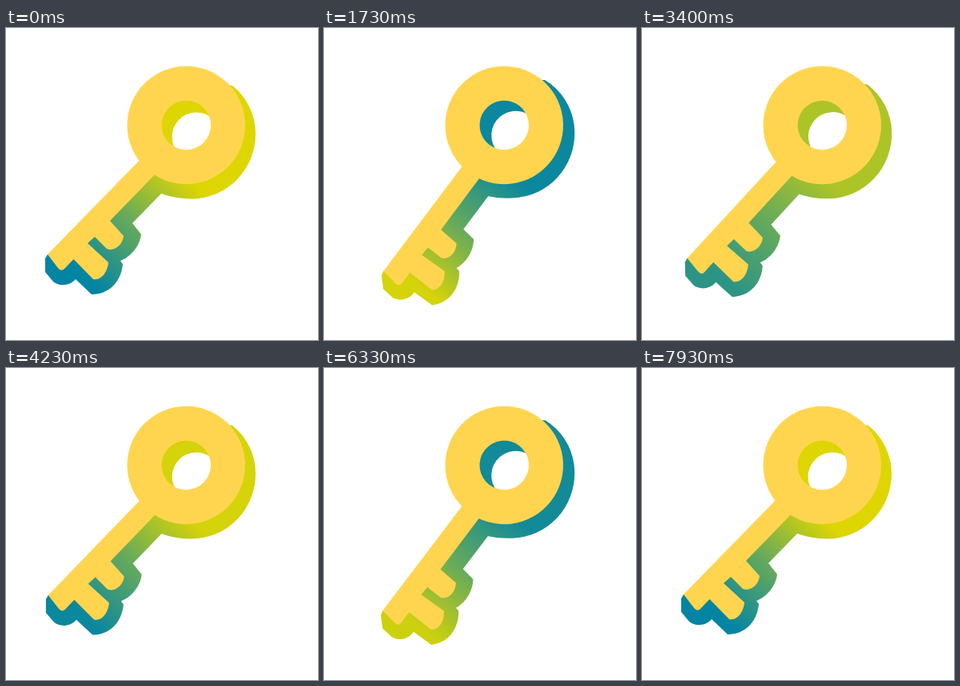
These frames come from a looping animation (390 px wide and 390 px high, 8010 ms). An HTML page:

```html
<!DOCTYPE html>
<html lang="en">
<head>
<meta charset="utf-8">
<title>Swinging key</title>
<style>
  html, body { margin: 0; width: 100%; height: 100%; overflow: hidden; background: #fff; }
  svg { display: block; width: 100%; height: 100%; }
</style>
</head>
<body>
<svg viewBox="0 0 390 390">
  <defs>
    <linearGradient id="shade" gradientUnits="userSpaceOnUse" x1="193.5" y1="153" x2="67.5" y2="281.6">
      <stop id="ringEnd" offset="0"/>
      <stop offset=".5" stop-color="#66aa5b"/>
      <stop id="tipEnd" offset="1"/>
    </linearGradient>
  </defs>
  <g id="key">
    <!-- thick side -->
    <path fill="url(#shade)" fill-rule="evenodd" d="
      M262 70 L283 72 A77 77 0 0 1 312 132 A80 81.5 0 0 1 232 213.5 A112 112 0 0 1 194 207
      L158 244 L169 258 C167 273 156 286 143 291 L146 295 C144 317 129 333 107 333
      L87 314 C79 323 66 323 59 317 L49 305 L49 288 L52 283 L56 281
      L168 168 L160 121 L190 65 Z
      M207.5 136 a30.5 30.5 0 1 0 61 0 a30.5 30.5 0 1 0 -61 0 Z"/>
    <!-- front face -->
    <g fill="#ffd54f">
      <path fill-rule="evenodd" d="
        M151.5 121.5 a73.75 73.75 0 1 0 147.5 0 a73.75 73.75 0 1 0 -147.5 0 Z
        M194.5 121.5 a30.75 30.75 0 1 0 61.5 0 a30.75 30.75 0 1 0 -61.5 0 Z"/>
      <path d="
        M175 157 L52 283 L65 300 Q69 305 73 301 L84.5 289 L109 314 C120 316 127 304 128 293
        L102 269 L111 261 L126 276 C135 280 146 271 147 260 L130 241 L196 173 Z"/>
    </g>
  </g>
</svg>
<script>
  const LOOP = 8010, SWING = 7.7, STEPS = 80;
  const YELLOW = [222, 214, 2], GREEN = [102, 170, 91], TEAL = [3, 132, 163];
  const $ = id => document.getElementById(id);

  // k runs from -1 (yellow) through 0 (green) to 1 (teal)
  function tint(k) {
    const end = k < 0 ? YELLOW : TEAL;
    return `rgb(${GREEN.map((c, i) => Math.round(c + (end[i] - c) * Math.abs(k)))})`;
  }

  // Poses advance at 0 and 30 ms of every 100 ms
  function stepAt(t) {
    return Math.min(159, 2 * Math.floor(t / 100) + (t % 100 >= 30 ? 1 : 0));
  }

  function draw(t) {
    const k = -Math.cos(2 * Math.PI * stepAt(t) / STEPS);
    $('key').setAttribute('transform', `rotate(${-SWING * (1 + k) / 2} 225 121.5)`);
    $('ringEnd').setAttribute('stop-color', tint(k));
    $('tipEnd').setAttribute('stop-color', tint(-k));
  }

  const start = performance.now();
  function tick() {
    draw((performance.now() - start) % LOOP);
    requestAnimationFrame(tick);
  }
  tick();
</script>
</body>
</html>
```
